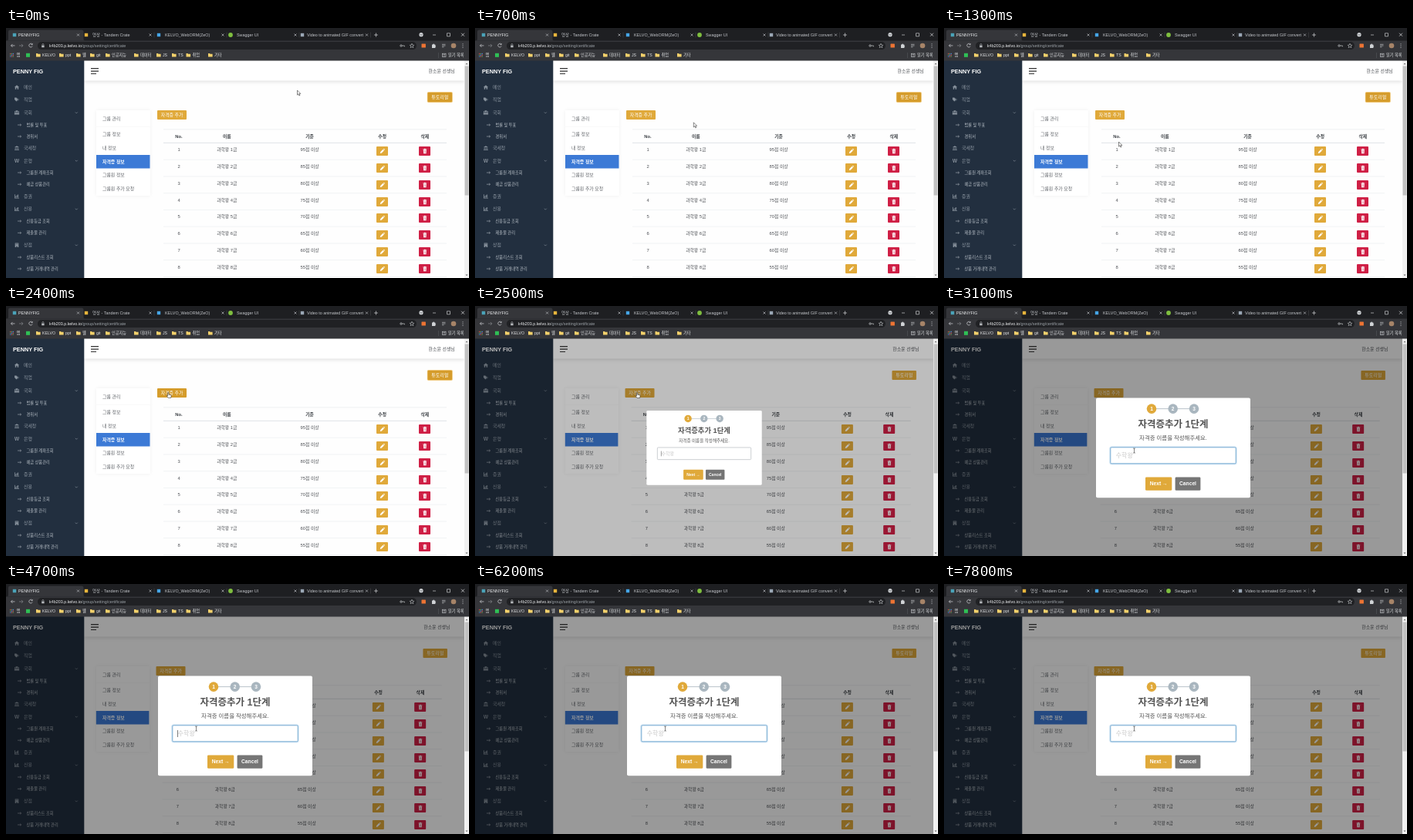
An HTML page that plays this animation: 600x325 px, repeating every 8000 ms.

```html
<!DOCTYPE html>
<html lang="ko">
<head>
<meta charset="utf-8">
<title>자격증 관리</title>
<style>
  html, body { margin: 0; width: 100%; height: 100%; overflow: hidden; background: #fff; }
  svg { display: block; width: 600px; height: 325px; }
  text { font-family: "Liberation Sans", "Noto Sans CJK KR", "Noto Sans CJK", sans-serif; white-space: pre; }
</style>
</head>
<body>
<svg id="stage" viewBox="0 0 600 325"></svg>
<script>
const LOOP = 8000, STEP = 100;
const GOLD = '#e0a93a', GOLD_DARK = '#d59c2b', RED = '#cf1f45', INK = '#4c4f54';
const stage = document.getElementById('stage');

// ---- drawing helpers ----
function add(parent, tag, attrs = {}, content) {
  const el = document.createElementNS('http://www.w3.org/2000/svg', tag);
  for (const key in attrs) el.setAttribute(key, attrs[key]);
  if (content !== undefined) el.textContent = content;
  parent.appendChild(el);
  return el;
}
const group = (parent, attrs) => add(parent, 'g', attrs);
const rect = (p, x, y, width, height, fill, more) => add(p, 'rect', { x, y, width, height, fill, ...more });
const dot = (p, cx, cy, r, fill) => add(p, 'circle', { cx, cy, r, fill });
const path = (p, d, fill, more) => add(p, 'path', { d, fill, ...more });
const line = (p, d, stroke, width = 0.7) => path(p, d, 'none', { stroke, 'stroke-width': width });
// y is the vertical middle of the text
const text = (p, x, y, size, fill, str, more) =>
  add(p, 'text', { x, y: y + size * 0.36, 'font-size': size, fill, ...more }, str);
const MID = { 'text-anchor': 'middle' }, BOLD = { 'font-weight': 700 };
const MID_BOLD = { ...MID, ...BOLD };
const cross = (p, x, y, r, color) =>
  line(p, `M${x - r} ${y - r}l${2 * r} ${2 * r}m0 ${-2 * r}l${-2 * r} ${2 * r}`, color);

const defs = add(stage, 'defs');
const blur = add(defs, 'filter', { id: 'soft', x: '-20%', y: '-100%', width: '140%', height: '300%' });
add(blur, 'feGaussianBlur', { stdDeviation: 2.6 });
add(add(defs, 'clipPath', { id: 'tabClip' }), 'rect', { x: 388, y: 0, width: 75, height: 17 });

const page = group(stage);
rect(page, 0, 42, 600, 283, '#fefefe');

// The open dialog narrows the page: boxes shrink towards EDGE, labels slide with them
const EDGE = 101, NARROW = 0.9868;
const narrowed = [];
function shrinker() {
  const g = group(page);
  narrowed.push([g, `translate(${EDGE * (1 - NARROW)} 0) scale(${NARROW} 1)`]);
  return g;
}
function slider(x) {
  const g = group(page);
  narrowed.push([g, `translate(${(EDGE - x) * (1 - NARROW)} 0)`]);
  return g;
}

// ---- page header ----
rect(page, 101, 62, 493, 8, '#000', { opacity: 0.12, filter: 'url(#soft)' });
rect(page, 101, 42, 493, 26.5, '#fff');
line(page, 'M110 52.7h10M110 56.1h10M110 59.5h7', '#333', 1.2);
text(slider(582), 547.6, 56, 5.9, INK, '한소윤 선생님');

const tutorial = slider(562);
const ring = rect(tutorial, 545.8, 83, 33, 14, '#efc87c', { rx: 1.8 });
const tutorialFace = rect(tutorial, 546.5, 84, 31.5, 12, GOLD, { rx: 1 });
text(tutorial, 562.3, 90.2, 6, '#fff', '튜토리얼', MID);

// ---- group menu ----
const menu = shrinker();
rect(menu, 117, 107, 70, 111, '#000', { opacity: 0.06, filter: 'url(#soft)' });
rect(menu, 117, 107, 70, 111, '#fff');
line(menu, 'M117 128.300h70', '#f4f4f4', 0.6);
rect(menu, 117, 165, 69.5, 17.5, '#3c7ad6');
[['그룹 관리', 118], ['그룹 정보', 138.2], ['내 정보', 155.8], ['자격증 정보', 173.4],
 ['그룹원 정보', 191], ['그룹원 추가 요청', 208.5]].forEach(([label, y], i) =>
  text(page, 125, y, 5.9, i === 3 ? '#fff' : '#5f6368', label, i === 3 ? BOLD : {}));

const addButton = slider(215);
const addFace = rect(addButton, 196, 107, 38, 12, GOLD, { rx: 1 });
text(addButton, 215.1, 113.2, 5.9, '#fff', '자격증 추가', MID);

// ---- certificate table ----
const ROW = 21.75, scores = [95, 85, 80, 75, 70, 65, 60, 55];
const rules = shrinker();
line(rules, 'M204 131.800h367', '#dee2e6', 0.5);
line(rules, 'M204 149.300h367', '#d9dde1', 0.8);
scores.forEach((_, i) => line(rules, `M204 ${171.2 + i * ROW}h367`, '#e3e6e9', 0.5));

const PENCIL = 'M-2.9 2.9l.5-2 3.2-3.2 1.5 1.5-3.2 3.2zM1.3-2.8l.7-.5 1.4 1.4-.6.7z';
const TRASH = 'M-2.4-2.6h1.5l.4-.6h1l.4.6h1.5v.8h-4.8zM-2-1.4h4l-.3 4.6h-3.4z';
function iconButton(g, x, y, color, icon) {
  rect(g, Math.round(x - 7.5), y - 6, 15, 12, color, { rx: 1 });
  path(g, icon, '#fff', { transform: `translate(${x} ${y})` });
  if (icon === TRASH) line(g, `M${x - 0.6} ${y - 0.6}v3M${x + 0.6} ${y - 0.6}v3`, color, 0.4);
}
const columns = [
  ['No.', 224, i => i + 1],
  ['이름', 286.3, i => `과학왕 ${i + 1}급`],
  ['기준', 393.6, i => `${scores[i]}점 이상`],
  ['수정', 487.7, null, GOLD, PENCIL],
  ['삭제', 542.8, null, RED, TRASH],
];
for (const [title, x, value, color, icon] of columns) {
  const g = slider(x);
  text(g, x, 140.7, 5.8, '#3c4045', title, MID_BOLD);
  scores.forEach((_, i) => {
    if (value) text(g, x, 158.3 + i * ROW, 5.8, INK, value(i), MID);
    else iconButton(g, x, Math.round(160.3 + i * ROW), color, icon);
  });
}

// ---- sidebar ----
rect(page, 0, 42, 101.3, 283, '#222f3f');
text(page, 9, 56.2, 7.3, '#fff', 'PENNY FIG', BOLD);
const icons = {
  home: 'M-3.4 0L0-3.1 3.4 0h-1v2.9h-1.6V.8h-1.6v2.1h-1.6V0z',
  tag: 'M-3.2-2.6h2.6L2 0-.6 2.6-3.2 0zM.2-2.6L3.2 0 .6 2.6l2-2.6z',
  hall: 'M-3.2-1.4L0-3.2l3.2 1.8zM-2.5-.9h1v2.5h-1zM-.5-.9h1v2.5h-1zM1.5-.9h1v2.5h-1zM-3.2 2h6.4v.9h-6.4z',
  people: 'M-1.5-3h3v2.4h-3zM-3.2-1.8h1.3v1.6h-1.3zM1.9-1.8h1.3v1.6h-1.3zM-3.4.2h6.8v2.5h-6.8z',
  won: 'M-3.2-2.7h.9l.8 3.8.9-3.8h1.2l.9 3.8.8-3.8h.9L2 2.7H1L0-1.2-1 2.7h-1zM-3.5-.6h7v.6h-7z',
  chart: 'M-3.2-2.8h.8v4.8h5.7v.8h-6.5zM-1.8-.2h1v1.7h-1zM-.3-1.6h1v3.1h-1zM1.3-2.5h1v4h-1z',
  shop: 'M-2.5-3h5v6h-1.8V1.3h-1.4V3h-1.8zM-1.5-2.1v1h1v-1zM.5-2.1v1h1v-1z',
};
// [icon, label, y, opens]; entries without an icon are sub-items
[['home', '메인', 77], ['tag', '직업', 93], ['people', '국회', 110, 1],
 ['', '법률 및 투표', 126], ['', '경위서', 141], ['hall', '국세청', 156.3],
 ['won', '은행', 172.4, 1], ['', '그룹원 계좌조회', 188], ['', '예금 상품관리', 203.2],
 ['chart', '증권', 218.8], ['chart', '신용', 235.3, 1], ['', '신용등급 조회', 251],
 ['', '제출물 관리', 266.3], ['shop', '상점', 282.2, 1], ['', '상품리스트 조회', 298],
 ['', '상품 거래내역 관리', 313]].forEach(([icon, label, y, opens]) => {
  if (icon) {
    path(page, icons[icon], '#87919c', { transform: `translate(14 ${y}) scale(.92)`, 'fill-rule': 'evenodd' });
    text(page, 23, y, 5.9, '#8f99a4', label);
  } else {
    line(page, `M15 ${y}h4.6m-1.4-1.3l1.4 1.3-1.4 1.3`, '#b4bbc3', 0.55);
    text(page, 26.6, y, 5.2, '#bac1c9', label);
  }
  if (opens) line(page, `M89.8 ${y - 0.6}l1.5 1.5 1.5-1.5`, '#929ca7', 0.6);
});

const shade = rect(stage, 0, 42, 594, 283, '#000', { opacity: 0 });

// ---- scrollbar ----
rect(stage, 594, 42, 6, 283, '#f1f1f1');
rect(stage, 594.6, 49.5, 5, 168, '#c1c1c1');
path(stage, 'M595.5 47.2l1.5-1.8 1.5 1.8zM595.5 320.5l1.5 1.8 1.5-1.8z', '#666');

// ---- browser frame ----
const chrome = group(stage);
rect(chrome, 0, 0, 600, 42.5, '#35363a');
rect(chrome, 0, 0, 600, 16.5, '#1e1f22');
path(chrome, 'M1 16.5q2 0 2-2V5q0-2.5 2.5-2.5h92.500q2.500 0 2.500 2.500v9.500q0 2 2 2z', '#35363a');
const tabs = [
  ['#4aa3b8', 'PENNYFIG', 11, 16, 93.5], ['#e6b43c', '영상 - Tandem Crate', 104, 112, 187],
  ['#45a5e6', 'KELVO_WebORM(ZeO)', 198, 206, 281], ['#7fbf3f', 'Swagger UI', 291, 299, 375],
  ['#9aa7b5', 'Video to animated GIF converter', 384, 390, 467.5],
];
tabs.forEach(([color, label, ix, tx, close], i) => {
  if (i === 3) dot(chrome, ix, 9, 2.9, color);
  else rect(chrome, ix - 2.2, 6.8, 4.4, 4.4, color);
  text(chrome, tx, 9, 5.4, i ? '#c3c6ca' : '#eceef0', label, i === 4 ? { 'clip-path': 'url(#tabClip)' } : {});
  cross(chrome, close, 9, 1.5, '#b9bcc0');
  if (i > 0 && i < 4) line(chrome, `M${close + 5} 5.500v7`, '#4a4c50', 0.5);
});
line(chrome, 'M472.500 5.500v7', '#4a4c50', 0.5);
line(chrome, 'M477 9h5M479.500 6.500v5', '#d0d3d6');
dot(chrome, 538, 8.7, 2.6, '#d0d3d6');
line(chrome, 'M536.700 8.200l1.300 1.300 1.300-1.300', '#1e1f22', 0.6);
line(chrome, 'M553 9h4M571.500 6.800h4v4h-4z', '#e4e6e8', 0.6);
cross(chrome, 592, 8.7, 2, '#e4e6e8');

line(chrome, 'M11.500 22.900h-5m2-2l-2 2 2 2', '#d3d5d8');
line(chrome, 'M17 22.900h5m-2-2l2 2-2 2', '#85888c');
line(chrome, 'M34 21.300a2.300 2.300 0 1 0 .2 2.300M34.200 20v1.700h-1.700', '#d3d5d8');
rect(chrome, 41, 18.1, 491, 10, '#202124', { rx: 5 });
rect(chrome, 46.2, 22.4, 3.4, 2.8, '#b5b8bc', { rx: 0.3 });
line(chrome, 'M46.900 22.500v-1a1 1 0 0 1 2 0v1', '#b5b8bc', 0.6);
const address = text(chrome, 56, 23, 5.4, '#eceef0', 'k4b203.p.kelvo.io');
add(address, 'tspan', { fill: '#9aa0a6' }, '/group/setting/certificate');
add(chrome, 'circle', { cx: 512, cy: 23, r: 1.2, fill: 'none', stroke: '#c6c9cc', 'stroke-width': 0.7 });
line(chrome, 'M513.200 23h3.200v1.300', '#c6c9cc');
path(chrome, 'M526 20.200l.8 1.900 2 .2-1.500 1.300.5 2-1.800-1.100-1.800 1.100.5-2-1.500-1.300 2-.2z', 'none',
  { stroke: '#c6c9cc', 'stroke-width': 0.6 });
rect(chrome, 538.5, 20.5, 5.4, 5, '#ee7433', { rx: 0.6 });
path(chrome, 'M552 21.500h1.300a.9.900 0 0 1 1.800 0h1.300v1.400a.9.900 0 0 1 0 1.700v1.300h-4.400z', '#d0d3d6');
line(chrome, 'M565 21.300h4.500M565 23h4.500M565 24.800h2.500', '#d0d3d6', 0.6);
dot(chrome, 580, 23, 3.3, '#a78468');
[20.8, 23, 25.2].forEach(y => dot(chrome, 592, y, 0.55, '#d0d3d6'));

for (let i = 0; i < 9; i++)
  rect(chrome, 5.2 + (i % 3) * 1.8, 32.8 + Math.floor(i / 3) * 1.8, 1.2, 1.2,
    ['#e2574c', '#58a55c', '#4f86ec'][(i + Math.floor(i / 3)) % 3]);
text(chrome, 13.5, 35.3, 5.2, '#e2e4e6', '앱');
rect(chrome, 26, 32.8, 5, 5, '#2fbf55');
[['KELVO', 47], ['ppt', 77], ['웹', 99], ['git', 117], ['인공지능', 137], ['데이터', 174],
 ['JS', 203], ['TS', 223], ['취업', 241.5], ['기타', 270]].forEach(([label, x]) => {
  path(chrome, `M${x - 8} 33h2l.6.7h3v3.800h-5.600z`, '#f2d06b');
  text(chrome, x, 35.3, 5.2, '#e2e4e6', label);
});
line(chrome, 'M560.500 32v7', '#5a5c60', 0.5);
rect(chrome, 565.5, 33.2, 4.5, 4.2, 'none', { stroke: '#d0d3d6', 'stroke-width': 0.6 });
line(chrome, 'M566.500 34.500h2.500M566.500 36h2.500', '#d0d3d6', 0.5);
text(chrome, 573, 35.3, 5.2, '#e2e4e6', '읽기 목록');

// ---- dialog ----
const dialog = group(stage);
rect(dialog, 197, 119.6, 200, 129.6, '#fff', { rx: 2 });
line(dialog, 'M269 133.600h55', '#b9c3ca', 1);
[269, 296.7, 324].forEach((x, i) => {
  dot(dialog, x, 133.6, 6.3, i ? '#a9b6bf' : GOLD);
  text(dialog, x, 133.6, 6.6, '#fff', i + 1, MID_BOLD);
});
text(dialog, 297, 153.9, 12.5, '#545454', '자격증추가 1단계', MID_BOLD);
text(dialog, 297, 171.2, 7.4, '#545454', '자격증 이름을 작성해주세요.', MID);
const glow = rect(dialog, 215.2, 183.2, 163.6, 22.2, 'none', { rx: 1.8, stroke: '#c9e0f2', 'stroke-width': 1.6 });
const field = rect(dialog, 215.8, 183.8, 162.4, 21, '#fff', { rx: 1.4, 'stroke-width': 0.9 });
text(dialog, 222.7, 194.2, 8, '#c8c8c8', '수학왕');
const caret = line(dialog, 'M222.500 190v9', '#444', 0.7);
[[261, 34.3, GOLD, 'Next →'], [299.6, 32.8, '#757575', 'Cancel']].forEach(([x, w, color, label]) => {
  rect(dialog, x, 222.4, w, 17.4, color, { rx: 1.4 });
  text(dialog, x + w / 2, 231, 6.7, '#fff', label, MID_BOLD);
});

// ---- pointers ----
const OUTLINE = { stroke: '#222', 'stroke-width': 0.55, 'stroke-linejoin': 'round' };
const pointer = group(stage);
const shapes = {
  arrow: path(pointer, 'M0 0v6.100l1.400-1.300 1 2.200 1-.4-1-2.200h1.900z', '#fff', OUTLINE),
  hand: path(pointer, 'M-.6.400q.6-.8 1.200 0v2.500l2.600.6q.8.300.7 1.100l-.5 2.600h-3.400l-2.200-2.600q0-.9.8-.6l.8.600z', '#fff', OUTLINE),
  beam: line(pointer, 'M-1.400-3h1q.4 0 .4.400v5.200q0 .4-.4.400h-1M1.400-3h-1q-.4 0-.4.400M1.400 3h-1q-.4 0-.4-.4', '#333', 0.6),
};

// ---- motion tables: [time, ...values] ----
const pointerPath = [[0, 377.5, 81], [1200, 226.5, 148], [1400, 226.5, 148], [2200, 210.5, 112],
  [2700, 210, 112.5], [3100, 246.5, 188]];
const popScale = [[2500, 0.747], [2600, 1.045], [2700, 0.96], [2800, 1]];
const shadeLevel = [[0, 0], [2500, 0.26], [2600, 0.4]];
const fieldBorder = [[2500, '#b3b9be'], [2600, '#6fa5cf']];
const caretState = [[0, 1], [3000, 0], [3600, 1], [4100, 0], [4700, 1], [5200, 0], [5800, 1],
  [6200, 0], [6700, 1], [7200, 0]];
const OPEN = 2500;

const held = (table, t) => (table.filter(k => k[0] <= t).pop() || table[0])[1];
function eased(table, t) {
  const i = table.findIndex(k => k[0] > t);
  if (i < 0) return table[table.length - 1].slice(1);
  const a = table[i - 1], b = table[i];
  const u = (t - a[0]) / (b[0] - a[0]), e = u * u * (3 - 2 * u);
  return a.slice(1).map((v, k) => v + (b[k + 1] - v) * e);
}

function draw(t) {
  const open = t >= OPEN;
  narrowed.forEach(([g, move]) => g.setAttribute('transform', open ? move : 'translate(0 0)'));
  shade.setAttribute('opacity', held(shadeLevel, t));
  ring.setAttribute('opacity', open ? 0 : 1);
  tutorialFace.setAttribute('fill', open ? GOLD : GOLD_DARK);

  dialog.setAttribute('display', open ? 'inline' : 'none');
  dialog.setAttribute('transform', `translate(297 184.4) scale(${held(popScale, t)}) translate(-297 -184.4)`);
  field.setAttribute('stroke', held(fieldBorder, t));
  glow.setAttribute('opacity', t > OPEN ? 1 : 0);
  caret.setAttribute('opacity', held(caretState, t));

  const [x, y] = eased(pointerPath, t);
  const onButton = x > 195 && x < 234 && y > 107 && y < 119;
  addFace.setAttribute('fill', onButton && !open ? GOLD_DARK : GOLD);
  const kind = onButton ? 'hand' : open && y > 183 ? 'beam' : 'arrow';
  for (const name in shapes) shapes[name].setAttribute('display', name === kind ? 'inline' : 'none');
  pointer.setAttribute('transform', `translate(${x} ${y})`);
}

const start = performance.now();
function tick() {
  const t = (performance.now() - start) % LOOP;
  draw(Math.floor(t / STEP) * STEP);
  requestAnimationFrame(tick);
}
tick();
</script>
</body>
</html>
```
